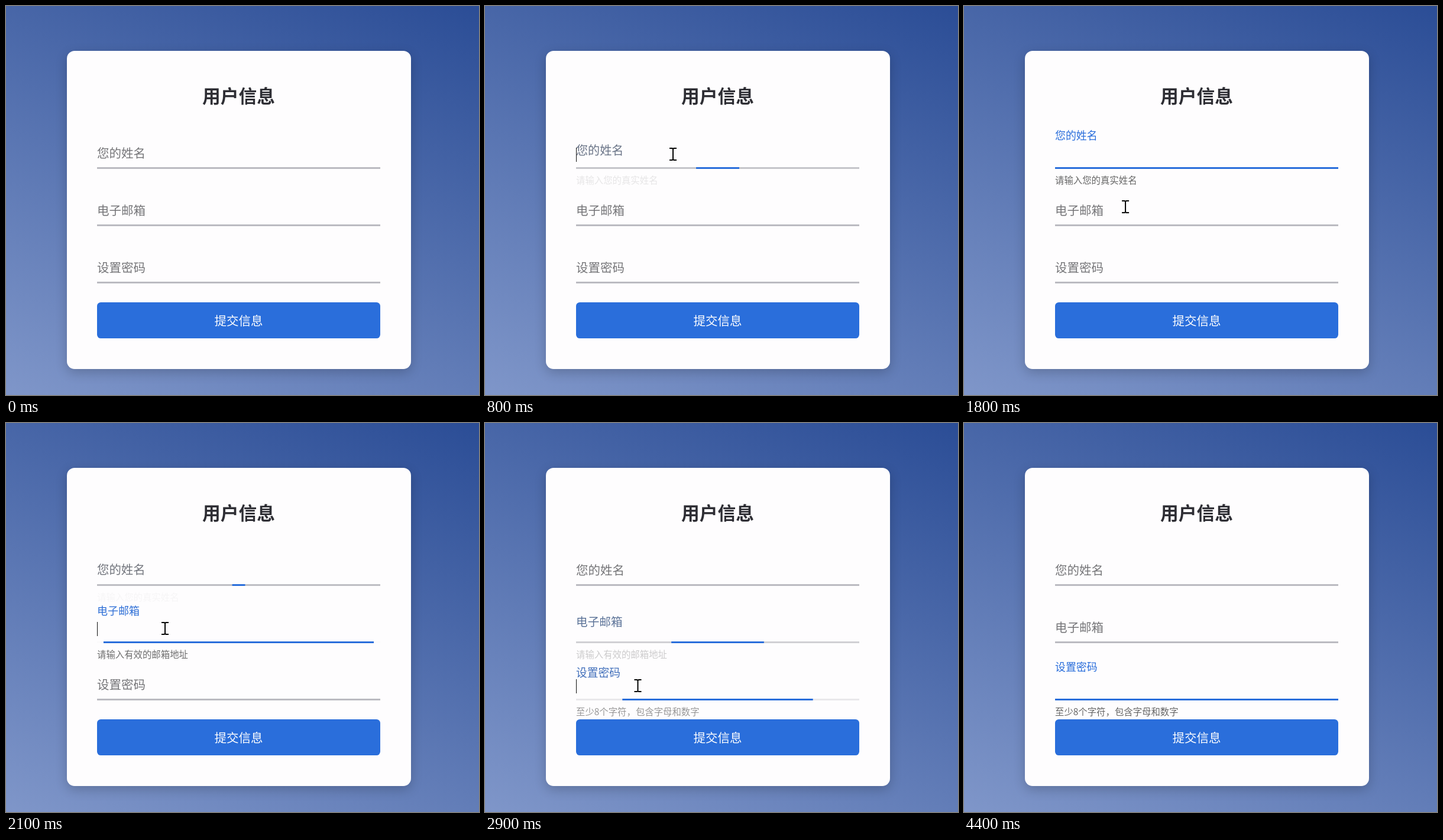
Write an HTML page that moves like this. It is 800 px wide and 659 px high and loops after 4.6 s.

```html
<!DOCTYPE html>
<html lang="zh-CN">
<head>
<meta charset="utf-8">
<title>用户信息</title>
<style>
  @property --focus { syntax: '<number>'; inherits: true; initial-value: 0; }
  @property --arrow { syntax: '<number>'; inherits: true; initial-value: 0; }

  :root {
    --delay: 0ms;
    --blue: #2a6edb;
    --grey: #757578;
  }
  html, body { margin: 0; width: 100%; height: 100%; overflow: hidden; }
  body {
    position: relative;
    background: linear-gradient(203deg, #2b4d96, #7f96c9);
    font-family: 'Noto Sans CJK SC', 'Noto Sans CJK', 'Noto Sans', sans-serif;
  }
  .card, h1, .field, .field *, .button, .mouse { position: absolute; margin: 0; white-space: nowrap; }

  .card {
    left: 102.5px; top: 76px; width: 582px; height: 539px;
    border-radius: 13px;
    background: #fefdfe;
    box-shadow: 0 6px 20px rgba(0, 0, 0, .2);
  }
  h1 {
    left: 154px; top: 131px; width: 479px;
    font-size: 30.72px; line-height: 40px; font-weight: 700;
    text-align: center; color: #2e2e34;
  }
  .button {
    left: 154px; top: 502px; width: 479px; height: 61px;
    border-radius: 6.4px;
    background: var(--blue);
    color: #fff; font-size: 20.5px; line-height: 61px; text-align: center;
  }

  /* Each field is anchored at the top of its underline. */
  .field {
    left: 154px; top: calc(273px + 97px * var(--row)); width: 479px; height: 3px;
    animation: var(--name) 4600ms var(--delay) infinite paused;
  }
  .label {
    left: 0; top: calc(-39.6px - 30px * var(--focus));
    font-size: calc(20.5px - 2.58px * var(--focus)); line-height: 30px;
    color: color-mix(in srgb, var(--blue) calc(var(--focus) * 100%), var(--grey));
  }
  .rule, .bar { left: 0; top: 0; width: 100%; height: 100%; }
  .rule { background: #bbbbc1; opacity: calc(1 - var(--focus)); }
  .bar { background: var(--blue); transform: scaleX(var(--focus)); }
  .hint {
    left: 0; top: 10.6px;
    font-size: 15.4px; line-height: 20px; color: #666;
    opacity: var(--focus);
  }
  .caret {
    left: 0; top: -33px; width: 1px; height: 24px;
    background: #111;
    animation: var(--blink) 4600ms step-end var(--delay) infinite paused;
  }

  .mouse {
    left: 0; top: 0; width: 1px; height: 1px; overflow: visible;
    animation:
      move 4600ms var(--delay) infinite paused,
      show 4600ms step-end var(--delay) infinite paused,
      shape 4600ms step-end var(--delay) infinite paused;
  }
  .arrow { fill: #fff; stroke: #000; stroke-width: 1.3; opacity: var(--arrow); }
  .beam { fill: none; opacity: calc(1 - var(--arrow)); }

  @keyframes name {
    0%, 16.522% { --focus: 0; }
    23.043%, 40.87% { --focus: 1; }
    47.391%, 100% { --focus: 0; }
  }
  @keyframes email {
    0%, 40.87% { --focus: 0; }
    47.391%, 60.478% { --focus: 1; }
    67%, 100% { --focus: 0; }
  }
  @keyframes password {
    0%, 60.478% { --focus: 0; }
    67%, 100% { --focus: 1; }
  }

  @keyframes name-caret {
    0%, 28.043%, 40.87%, 100% { opacity: 0; }
    16.522%, 39.565% { opacity: 1; }
  }
  @keyframes email-caret {
    0%, 52.391%, 100% { opacity: 0; }
    40.87% { opacity: 1; }
  }
  @keyframes password-caret {
    0%, 71.957%, 94.565%, 100% { opacity: 0; }
    60.478%, 82.391% { opacity: 1; }
  }

  @keyframes move {
    0%, 2.174% { transform: translate(748px, 598px); }
    13.043%, 30.435% { transform: translate(318px, 251px); animation-timing-function: ease-in-out; }
    41.304%, 48.913% { transform: translate(269px, 348px); animation-timing-function: ease-in-out; }
    58.696%, 100% { transform: translate(258.5px, 445px); }
  }
  @keyframes show {
    0%, 71.739%, 100% { opacity: 0; }
    2.174% { opacity: 1; }
  }
  @keyframes shape {
    0%, 7.609%, 33.696%, 52.174% { --arrow: 1; }
    5.435%, 9.783%, 38.696%, 55.217%, 100% { --arrow: 0; }
  }
</style>
</head>
<body>
  <div class="card"></div>
  <h1>用户信息</h1>

  <div class="field" style="--row: 0; --name: name; --blink: name-caret">
    <span class="label">您的姓名</span>
    <i class="rule"></i><i class="bar"></i><i class="caret"></i>
    <span class="hint">请输入您的真实姓名</span>
  </div>
  <div class="field" style="--row: 1; --name: email; --blink: email-caret">
    <span class="label">电子邮箱</span>
    <i class="rule"></i><i class="bar"></i><i class="caret"></i>
    <span class="hint">请输入有效的邮箱地址</span>
  </div>
  <div class="field" style="--row: 2; --name: password; --blink: password-caret">
    <span class="label">设置密码</span>
    <i class="rule"></i><i class="bar"></i><i class="caret"></i>
    <span class="hint">至少8个字符，包含字母和数字</span>
  </div>

  <div class="button">提交信息</div>

  <svg class="mouse">
    <path class="arrow" d="M0 0V21L5 16.5 8.5 24 11.5 22.5 8.2 15H15Z"/>
    <g class="beam">
      <path id="stem" d="M-6-10H-1.5L0-9.2 1.5-10H6M0-9.5V9.5M-6 10H-1.5L0 9.2 1.5 10H6" stroke="#fff" stroke-width="3.4"/>
      <use href="#stem" style="display: none"/>
      <path d="M-6-10H-1.5L0-9.2 1.5-10H6M0-9.5V9.5M-6 10H-1.5L0 9.2 1.5 10H6" stroke="#000" stroke-width="2"/>
    </g>
  </svg>

<script>
  // The picture advances in 100 ms steps; the slack absorbs clock rounding.
  const LOOP = 4600, STEP = 100, SLACK = 8;
  const start = performance.now();

  function tick() {
    const time = (performance.now() - start + SLACK) % LOOP;
    const held = Math.floor(time / STEP) * STEP;
    document.documentElement.style.setProperty('--delay', -held + 'ms');
    requestAnimationFrame(tick);
  }
  tick();
</script>
</body>
</html>
```
